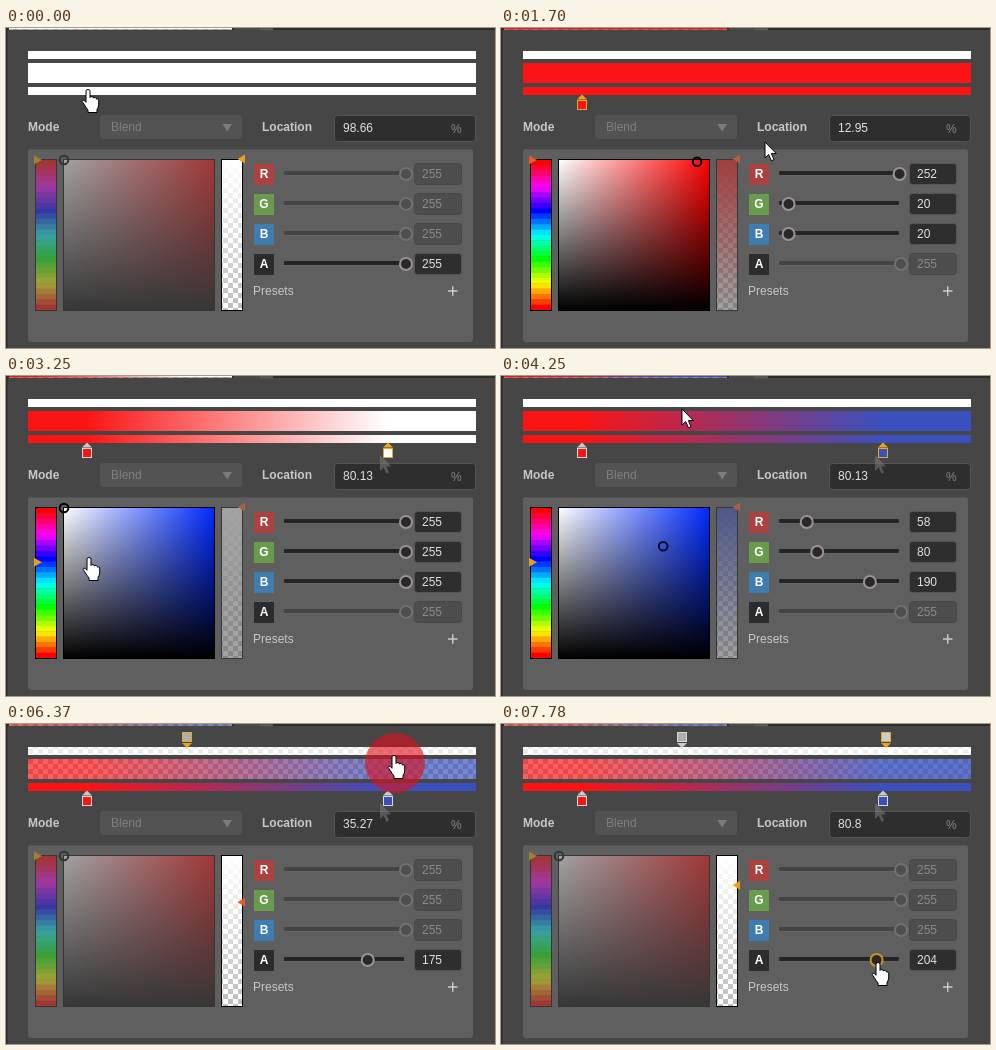
An HTML page for the animation above (8000 ms loop, 489x320 px).

```html
<!DOCTYPE html>
<html lang="en">
<head>
<meta charset="utf-8">
<title>Gradient editor</title>
<style>
html, body { margin: 0; width: 100%; height: 100%; overflow: hidden; background: #464646; }
svg { display: block; width: 489px; height: 320px; }
text { font: 12px "Liberation Sans", Arial, sans-serif; fill: #c8c8c8; }
.bold { font-weight: bold; }
.tag { font-weight: bold; fill: #fff; text-anchor: middle; }
.field { fill: #2e2e2e; stroke: #555; }
.value { fill: #e0e0e0; }
.track { fill: #242424; }
.thumb { fill: #2c2728; stroke: #9b9494; stroke-width: 2; }
.off .field { fill: #4d4d4d; stroke: #484848; }
.off .value { fill: #8a8a8a; }
.off .track { fill: #444; }
.off .thumb { fill: #4e4e4e; stroke: #717171; }
.hot .thumb { stroke: #c8961e; }
.dim { opacity: .42; }
.stop { fill: #c9c9c9; stroke: none; }
.stop .box { stroke: #d8d8d8; }
.stop.sel { fill: #eba21c; }
.stop.sel .box { stroke: #e0a838; }
</style>
</head>
<body>
<svg viewBox="0 0 489 320" xmlns="http://www.w3.org/2000/svg">
  <defs>
    <pattern id="check" width="10" height="10" x="22" y="35" patternUnits="userSpaceOnUse">
      <path fill="#fff" d="M0 0h10v10H0z"/>
      <path fill="#bdbdbd" d="M0 0h5v5H0zM5 5h5v5H5z"/>
    </pattern>
    <linearGradient id="colors">
      <stop id="c0" offset=".1295"/><stop id="c1" offset=".8013"/>
    </linearGradient>
    <linearGradient id="alphas">
      <stop id="a0" offset=".3527" stop-color="#fff"/><stop id="a1" offset=".808" stop-color="#fff"/>
    </linearGradient>
    <mask id="fade" maskContentUnits="objectBoundingBox">
      <rect width="1" height="1" fill="url(#alphas)"/>
    </mask>
    <linearGradient id="sat">
      <stop stop-color="#fff"/><stop id="hueStop" offset="1"/>
    </linearGradient>
    <linearGradient id="val" x2="0" y2="1">
      <stop stop-opacity="0"/><stop offset="1"/>
    </linearGradient>
    <linearGradient id="alphaRamp" x2="0" y2="1">
      <stop id="r0"/><stop id="r1" offset="1" stop-opacity="0"/>
    </linearGradient>
    <path id="arrow" d="M0 0V16L3.7 12.6 6.4 18.8 9 17.7 6.4 11.6H11.3Z"/>
  </defs>

  <rect width="489" height="320" fill="#464646"/>
  <path fill="#2d2d2d" d="M0 0H489V2H0zM0 0H1.5V320H0z"/>
  <path fill="#4a4a4a" d="M228 0H254V2H228z"/>
  <path fill="#585858" d="M254 0H267V2.5H254z"/>

  <rect x="3" width="223" height="1.5" fill="url(#check)"/>
  <rect x="3" width="223" height="1.5" fill="url(#colors)" mask="url(#fade)"/>
  <rect x="22" y="23" width="448" height="8" fill="url(#check)"/>
  <rect x="22" y="23" width="448" height="8" fill="url(#alphas)"/>
  <rect x="22" y="35" width="448" height="20" fill="url(#check)"/>
  <rect x="22" y="35" width="448" height="20" fill="url(#colors)" mask="url(#fade)"/>
  <rect x="22" y="59" width="448" height="8" fill="url(#colors)"/>

  <text class="bold" x="22" y="103">Mode</text>
  <rect x="94" y="87" width="142" height="24" rx="3" fill="#535353"/>
  <text x="105" y="103" style="fill:#808080">Blend</text>
  <path fill="#7c7c7c" d="M216.5 96H226L221.2 103.5z"/>
  <text class="bold" x="256" y="103">Location</text>
  <rect class="field" x="328.5" y="87.5" width="141" height="26" rx="3"/>
  <text id="loc" class="value" x="337" y="104"></text>
  <text x="445" y="105" style="fill:#858585">%</text>
  <use id="ghost" href="#arrow" x="374" y="79" fill="#777" opacity=".6"/>

  <rect x="22" y="121" width="445" height="193" rx="3" fill="#5f5f5f"/>
  <path d="M24 121.5H465" stroke="#555"/>
  <g id="picker">
    <g id="hues"></g>
    <rect x="29.5" y="131.5" width="21" height="151" fill="none" stroke="#000"/>
    <rect x="57.5" y="131.5" width="151" height="151" fill="url(#sat)"/>
    <rect x="57.5" y="131.5" width="151" height="151" fill="url(#val)" stroke="#000"/>
  </g>
  <circle id="ring" r="4.3" fill="none" stroke-width="2"/>
  <path id="huePin" d="M28 -4.5L36 0 28 4.5z"/>
  <g id="ramp">
    <rect x="216" y="132" width="21" height="150" fill="url(#check)"/>
    <rect x="215.5" y="131.5" width="21" height="151" fill="url(#alphaRamp)" stroke="#000"/>
  </g>
  <path id="alphaPin" d="M239 -4.5L231.500 0 239 4.5z"/>
  <g id="rows"></g>
  <text x="247" y="267">Presets</text>
  <path d="M442 263H451.500M446.750 258.300V267.700" stroke="#ccc" stroke-width="1.4"/>

  <g id="stops"></g>
  <circle id="press" fill="#e10f19" fill-opacity=".6"/>
  <g id="cursor" fill="#fff" stroke="#000" stroke-linejoin="round">
    <path id="hand" d="M-2 2Q-2 .5 0 .5T2 2V8.500Q2.500 7.300 4 7.600T5.500 9Q6 8.200 7.300 8.600T8.600 10.200Q9.300 9.500 10.200 10.200T10.700 12V16Q10.500 18.500 9 20.500V23.500H0V21Q-2 18.500 -3.500 16T-5.800 12.500Q-5.500 10.500 -3.800 11.300L-2 13.300Z"/>
    <use id="pointer" href="#arrow"/>
  </g>
</svg>
<script>
const LOOP = 8000, TICK = 77;
const WHITE = [255, 255, 255], RED = [252, 20, 20], BLUE = [58, 80, 190];
const ORANGE = '#e8a01c', EMBER = '#f0582a';

const $ = id => document.getElementById(id);
const css = c => `rgb(${c})`;
const set = (el, attrs) => { for (const k in attrs) el.setAttribute(k, attrs[k]); };
const show = (el, on) => { el.style.display = on ? '' : 'none'; };

// Each entry overrides the settings before it.
const changes = [
  [0, { mode: 'a', loc: '98.66', rgb: WHITE, hue: 0, bar: [WHITE, WHITE], fade: [255, 255],
        stops: 0, sel: -1, pin: ORANGE }],
  [400, { mode: 'c', loc: '12.95', stops: 1, sel: 0 }],
  [1160, { rgb: RED }],
  [1310, { bar: [RED, RED], pin: EMBER }],
  [2240, { rgb: WHITE, loc: '80.13', bar: [RED, WHITE], stops: 2, sel: 1 }],
  [3020, { hue: 230, pin: ORANGE }],
  [3550, { rgb: BLUE }],
  [3700, { bar: [RED, BLUE] }],
  [4690, { mode: 'a', rgb: WHITE, hue: 0, loc: '35.27', stops: 3, sel: 2 }],
  [5470, { pin: EMBER }],
  [5860, { fade: [175, 175] }],
  [6540, { loc: '80.8', stops: 4, sel: 3, fade: [175, 255], pin: ORANGE }],
  [7770, { fade: [175, 204] }]
];

// time, x, y of the cursor tip
const path = [
  [0, 82, 61], [150, 82, 66], [700, 82, 66], [1078, 198, 139], [1155, 199, 140],
  [1540, 199, 140], [1925, 383, 66], [2400, 383, 66], [3003, 44, 186], [3090, 44, 186],
  [3465, 164, 172], [3940, 164, 172], [4235, 181, 33], [4389, 184, 29], [4850, 184, 29],
  [5000, 237, 134], [5400, 237, 134], [5775, 237, 180], [5800, 237, 180], [6230, 388, 31],
  [6470, 388, 31], [6980, 398, 239], [7240, 398, 239], [7700, 377, 238]
];

// start, end, radius of the press highlight
const presses = [
  [320, 470, 30], [1160, 1310, 30], [2070, 2240, 20], [3020, 3170, 30], [3550, 3700, 30],
  [4540, 4690, 30], [5150, 5860, 30], [6300, 6540, 30], [7160, 7770, 30]
];

// left, top, right, bottom of areas with a hand cursor
const zones = [
  [22, 20, 470, 32], [22, 58, 470, 72], [28, 130, 51, 284], [57, 130, 210, 284],
  [214, 126, 241, 284], [278, 228, 408, 244]
];

const ease = p => p * p * (3 - 2 * p);

function tween(keys, t) {
  const i = keys.findIndex(k => k[0] > t);
  if (i < 0) return keys[keys.length - 1].slice(1);
  const a = keys[i - 1], b = keys[i];
  const p = ease((t - a[0]) / (b[0] - a[0]));
  return a.slice(1).map((v, n) => v + (b[n + 1] - v) * p);
}

function alphaAt(t) {
  const keys = t < 6540
    ? [[0, 255], [5400, 255], [5775, 175]]
    : [[6540, 255], [7240, 255], [7700, 204]];
  return Math.round(tween(keys, Math.max(t, keys[0][0]))[0]);
}

const BANDS = 28, bandH = 150 / BANDS;
for (let i = 0; i < BANDS; i++) {
  $('hues').innerHTML += `<rect x="30" y="${132 + i * bandH}" width="20" height="${bandH + .3}"
    fill="hsl(${360 - i * 360 / (BANDS - 1)} 100% 50%)"/>`;
}

[['R', '#ab4240'], ['G', '#6a9a4c'], ['B', '#3f7cb0'], ['A', '#2c2c2c']].forEach(([name, color], i) => {
  $('rows').innerHTML += `<g transform="translate(0 ${146 + 30 * i})">
    <rect x="248" y="-10" width="20" height="21" fill="${color}"/>
    <text class="tag" x="258" y="4">${name}</text>
    <rect class="track" x="278" y="-3" width="120" height="4" rx="1"/>
    <path d="M278 1.500H398" stroke="#6b6b6b" opacity=".5"/>
    <circle class="thumb" r="6"/>
    <rect class="field" x="408.500" y="-10.500" width="47" height="21" rx="3"/>
    <text class="value" x="416" y="4"></text></g>`;
});
const rows = [...$('rows').children];

[[81, 0], [382, 0], [181, 1], [385, 1]].forEach(([x, top]) => {
  $('stops').innerHTML += `<g class="stop" transform="translate(${x} ${top ? 13 : 77})">
    <path d="${top ? 'M-5 6H5L0 11z' : 'M-5 -5.500H5L0 -10.500z'}"/>
    <rect class="box" x="-4.500" y="-4.500" width="9" height="9"/></g>`;
});
const stops = [...$('stops').children];

function drawRow(row, value, on) {
  row.classList.toggle('off', !on);
  row.querySelector('.thumb').setAttribute('cx', 278 + 122 * value / 255);
  row.querySelector('.value').textContent = value;
}

function drawPicker(s, alpha) {
  const color = s.mode === 'c';
  const max = Math.max(...s.rgb), min = Math.min(...s.rgb);
  $('picker').classList.toggle('dim', !color);
  $('ramp').classList.toggle('dim', color);
  set($('hueStop'), { 'stop-color': `hsl(${s.hue} 100% 50%)` });
  set($('ring'), {
    cx: 58 + 150 * (max - min) / max,
    cy: 132 + 150 * (1 - max / 255),
    stroke: color ? (s.rgb === BLUE ? '#0a0a30' : '#000') : '#333'
  });
  set($('huePin'), {
    transform: `translate(0 ${132 + 150 * (s.hue ? 1 - s.hue / 360 : 0)})`,
    fill: color ? s.pin : '#9a8434'
  });
  set($('alphaPin'), {
    transform: `translate(0 ${131 + 151 * (1 - alpha / 255)})`,
    fill: color ? '#a8603f' : s.pin
  });
  for (const id of ['r0', 'r1']) set($(id), { 'stop-color': css(s.rgb) });
  rows.forEach((row, i) => drawRow(row, i < 3 ? s.rgb[i] : alpha, (i < 3) === color));
}

function drawBars(s, alpha) {
  s.bar.forEach((c, i) => set($('c' + i), { 'stop-color': css(c) }));
  s.fade.forEach((a, i) => set($('a' + i), { 'stop-opacity': a / 255 }));
  const grey = a => css([a, a, a]);
  const fills = [...s.bar.map(css), ...s.fade.map(grey)];
  if (s.sel >= 0) fills[s.sel] = s.mode === 'c' ? css(s.rgb) : grey(alpha);
  stops.forEach((el, i) => {
    show(el, i < s.stops);
    el.classList.toggle('sel', i === s.sel);
    el.lastElementChild.setAttribute('fill', fills[i]);
  });
}

function drawCursor(t, tick) {
  const [x, y] = tween(path, tick).map(Math.round);
  const hand = zones.some(z => x >= z[0] && y >= z[1] && x <= z[2] && y <= z[3]);
  set($('cursor'), { transform: `translate(${x} ${y})` });
  show($('hand'), hand);
  show($('pointer'), !hand);
  const press = presses.find(p => t >= p[0] && t < p[1]);
  show($('press'), press);
  if (press) set($('press'), { cx: x + 1, cy: y + 8, r: press[2] });
}

function draw() {
  const t = performance.now() % LOOP;
  const tick = Math.floor(t / TICK) * TICK;
  const s = Object.assign({}, ...changes.filter(c => c[0] <= t).map(c => c[1]));
  const alpha = alphaAt(t < 6540 ? tick : Math.max(tick, 6540));
  $('loc').textContent = s.loc;
  drawPicker(s, alpha);
  drawBars(s, alpha);
  drawCursor(t, tick);
  rows[3].classList.toggle('hot', t >= 6980);
  show($('ghost'), t >= 2620);
  requestAnimationFrame(draw);
}
draw();
</script>
</body>
</html>
```
